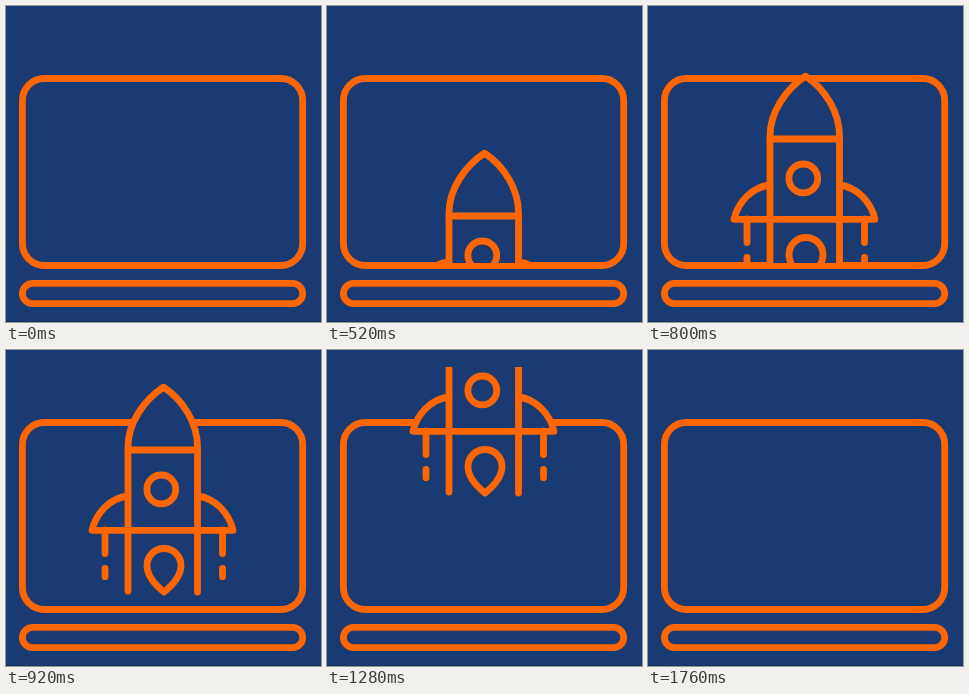
These frames come from a looping animation (315 px wide and 316 px high, 2480 ms). An HTML page:

```html
<!DOCTYPE html>
<html lang="en">
<head>
<meta charset="utf-8">
<title>Rocket launch</title>
<style>
  html, body { margin: 0; width: 100%; height: 100%; overflow: hidden; background: #1a3a73; }
  svg { display: block; width: 100vw; height: 100vh; }
  .line { fill: none; stroke: #ff6600; stroke-width: 6.8; stroke-linecap: round; stroke-linejoin: round; }
  .solid { fill: #1a3a73; stroke: none; }
</style>
</head>
<body>
<svg viewBox="0 0 315 316">
  <defs>
    <clipPath id="sky"><rect x="0" y="17.6" width="315" height="238.6"/></clipPath>
  </defs>
  <rect width="315" height="316" fill="#1a3a73"/>
  <rect y="315" width="315" height="1" fill="#17325f"/>

  <g class="line">
    <rect x="16.4" y="72.5" width="280.3" height="187" rx="22"/>
    <rect x="16.4" y="277.4" width="280.3" height="20.2" rx="10.1"/>
  </g>

  <g clip-path="url(#sky)">
    <g id="rocket" class="line">
      <g class="solid">
        <path d="M122 310V163C122 139 138 116 157.5 103C177 116 191.5 139 191.5 163V310Z"/>
        <path d="M122 212C104 214 90 229 86 246H227C223 229 209 214 191.5 212Z"/>
      </g>
      <path d="M122 307V163C122 139 138 116 157.5 103.2C177 116 191.5 139 191.5 163V308"/>
      <path d="M122 166H191.5"/>
      <circle cx="155.3" cy="205.4" r="14.4"/>
      <path d="M122 212C104 214 90 229 86 246.3H227C223 229 209 214 191.5 212"/>
      <path d="M99 246V269.5M99 284.3V292.7M216.5 246V269.5M216.5 284.3V292.7"/>
      <path d="M158 308C148 300 141 291 141 281.5A17 17 0 0 1 175 281.5C175 291 168 300 158 308Z"/>
    </g>
  </g>
</svg>
<script>
  const LOOP = 2480, FLIGHT = 1760, TICK = 40, RISE = 11;
  const ticks = FLIGHT / TICK;
  const startY = 187, endY = startY - ticks * RISE;
  const shift = y => `translate(0px, ${y}px)`;

  // The 1 ms lead keeps each tick clear of rounding at its boundary.
  document.getElementById('rocket').animate([
    { transform: shift(startY), offset: 0, easing: `steps(${ticks}, end)` },
    { transform: shift(endY), offset: FLIGHT / LOOP },
    { transform: shift(endY), offset: 1 }
  ], { duration: LOOP, delay: -1, iterations: Infinity });
</script>
</body>
</html>
```
